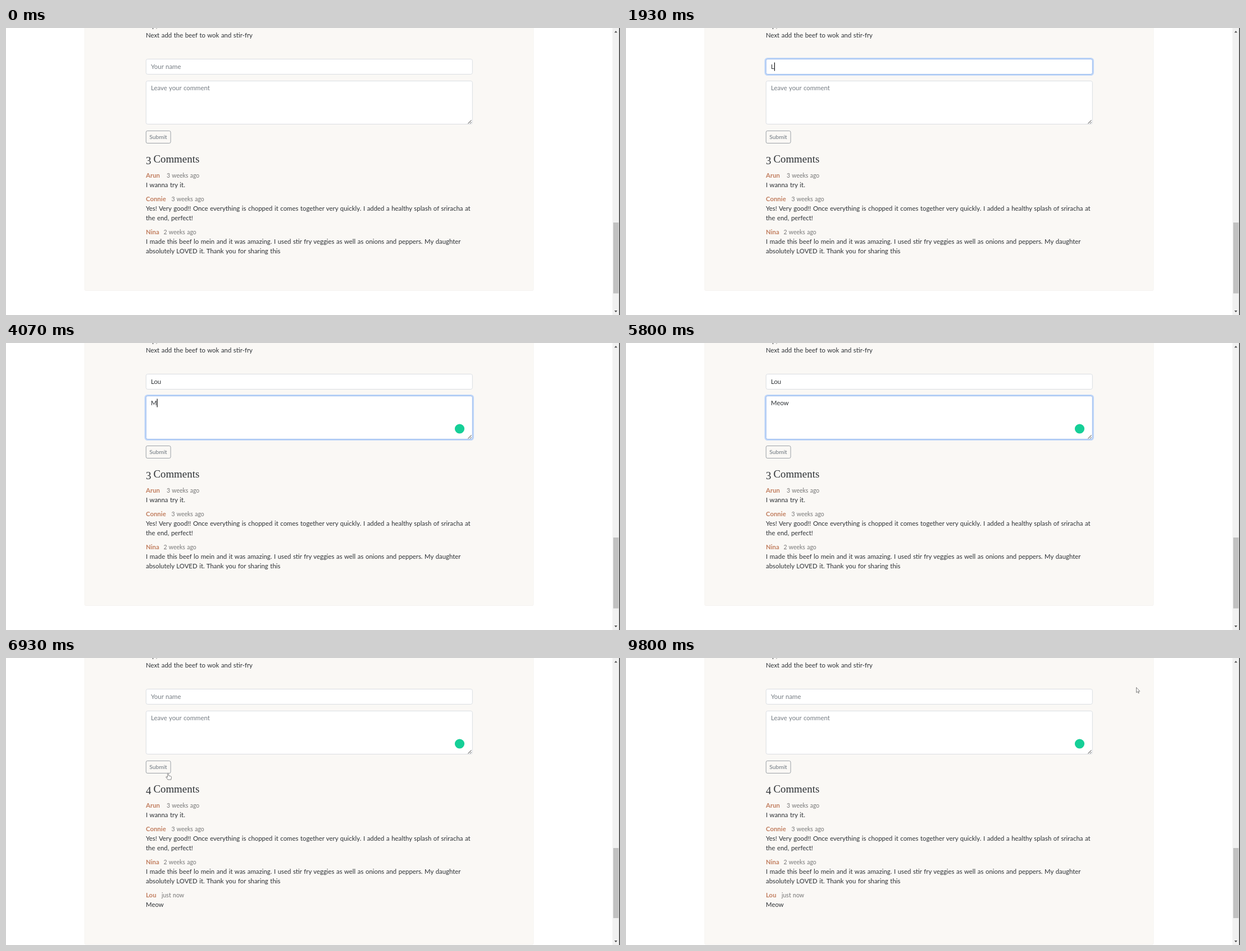
Animation, 1093 px wide and 512 px high, one loop 9940 ms. Source, as an HTML page:

```html
<!DOCTYPE html>
<html lang="en">
<head>
<meta charset="utf-8">
<title>Recipe comments</title>
<style>
html, body { margin: 0; width: 100%; height: 100%; overflow: hidden; background: #fff; }
svg { display: block; width: 1093px; height: 512px; }
text { font: 11.39px Lato, sans-serif; word-spacing: .66px; fill: #2d3135; white-space: pre; }
.hint { fill: #757c83; }
.name { font-weight: 700; fill: #c27f60; }
.date { font-size: 10.5px; fill: #777; }
.title { font: 18.9px "Liberation Serif", serif; word-spacing: -.8px; }
.btn { font-size: 10.3px; fill: #6c757d; }
.box { fill: #fff; stroke: #d6dbe0; stroke-width: .9; }
.box.focus { stroke: #8fb4ee; }
.ring { fill: none; stroke: #c0d7f8; stroke-width: 3; }
.pointer { fill: #fff; stroke: #666; stroke-width: .8; stroke-linejoin: round; }
</style>
</head>
<body>
<svg viewBox="0 0 1093 512">
  <rect id="panel" x="140" y="-9" width="799" fill="#faf8f5" stroke="#f4f2ef" stroke-width=".8" rx="2"/>
  <text x="249" y="0">Dip,</text>
  <text x="249" y="17">Next add the beef to wok and stir-fry</text>

  <rect id="nameRing" class="ring" x="248" y="54.5" width="583.5" height="29" rx="4"/>
  <rect id="nameBox" class="box" x="249.3" y="55.5" width="581" height="27" rx="3"/>
  <text id="nameText" x="258" y="73"></text>

  <rect id="noteRing" class="ring" x="248" y="93.5" width="583.5" height="79" rx="4"/>
  <rect id="noteBox" class="box" x="249.3" y="94.5" width="581" height="77" rx="3"/>
  <text id="noteText" x="258" y="111"></text>
  <path d="M822.5 170.5l6-6M826 170.5l2.5-2.5" stroke="#333" fill="none"/>
  <circle id="badge" cx="807.5" cy="153" r="8.6" fill="#15cf97"/>
  <rect id="caret" width="1.2" height="15" fill="#111"/>

  <rect id="button" x="249.3" y="183.5" width="43.8" height="22" rx="2.5" stroke="#858c93" stroke-width=".8"/>
  <text id="label" class="btn" x="255.2" y="198">Submit</text>

  <text class="title" x="249" y="239.5"><tspan id="count" dy="3"></tspan><tspan dy="-3"> Comments</tspan></text>
  <g id="comments"></g>

  <rect x="1079.5" width="12" height="512" fill="#f1f1f1"/>
  <rect id="thumb" x="1081" width="9.5" fill="#c1c1c1"/>
  <path d="M1083 8.3l2.6-3.2 2.6 3.2zM1083 504l2.6 3.2 2.6-3.2z" fill="#505050"/>
  <rect x="1091.5" width="1.5" height="512" fill="#333"/>

  <circle id="dot" cx="389.5" cy="69" r="1.8" fill="#cf8486"/>
  <path id="hand" class="pointer" d="M-1 1Q0-.8 1 1V5L5 6Q6 6.3 6 7.5L5.3 12H-.5L-3.5 8Q-4 6.3-2.5 6.8L-1 8Z"/>
  <path id="arrow" class="pointer" d="M0 0V9.3L2.1 7.3 3.5 10.4 4.8 9.8 3.5 6.8H6.2Z"/>
</svg>
<script>
const LOOP = 9940, SENT = 6870;
const $ = id => document.getElementById(id);
const show = (id, on) => $(id).style.display = on ? '' : 'none';
const attrs = (id, set) => { for (const k in set) $(id).setAttribute(k, set[k]); };

// Author, date, x of the date, baseline, lines
const comments = [
  ['Arun', '3 weeks ago', 286, 267, 'I wanna try it.'],
  ['Connie', '3 weeks ago', 294.5, 309,
    'Yes! Very good!! Once everything is chopped it comes together very quickly. I added a healthy splash of sriracha at',
    'the end, perfect!'],
  ['Nina', '2 weeks ago', 280.5, 368,
    'I made this beef lo mein and it was amazing. I used stir fry veggies as well as onions and peppers. My daughter',
    'absolutely LOVED it. Thank you for sharing this'],
  ['Lou', 'just now', 277, 427, 'Meow']
];
$('comments').innerHTML = comments.map(([who, when, x, y, ...lines]) =>
  `<g><text class="name" x="249" y="${y}">${who}</text><text class="date" x="${x}" y="${y}">${when}</text>` +
  lines.map((s, i) => `<text x="249" y="${y + 16.7 + i * 17}">${s}</text>`).join('') + '</g>').join('');

const fields = [
  { id: 'name', hint: 'Your name', text: 'Lou', keys: [1730, 2070, 2400], from: 870, to: 3530, caretY: 61.5 },
  { id: 'note', hint: 'Leave your comment', text: 'Meow', keys: [4070, 4330, 4670, 5130], from: 3530, to: SENT, caretY: 99.5 }
];

function drawField(f, t) {
  const typed = f.keys.filter(k => k <= t);
  const value = t < SENT ? f.text.slice(0, typed.length) : '';
  const focus = t >= f.from && t < f.to;
  const text = $(f.id + 'Text');
  text.textContent = value || f.hint;
  text.setAttribute('class', value ? '' : 'hint');
  $(f.id + 'Box').setAttribute('class', focus ? 'box focus' : 'box');
  show(f.id + 'Ring', focus);
  if (!focus) return;
  const since = t - (typed.pop() ?? f.from);
  const width = value ? text.getComputedTextLength() : 0;
  show('caret', Math.floor(since / 530) % 2 === 0);
  attrs('caret', { x: 258 + width, y: f.caretY });
}

// Moves a pointer from a to b between two times
function move(id, t, t0, t1, a, b) {
  const p = Math.min(1, Math.max(0, (t - t0) / (t1 - t0)));
  const e = p * p * (3 - 2 * p);
  attrs(id, { transform: `translate(${a[0] + (b[0] - a[0]) * e} ${a[1] + (b[1] - a[1]) * e})` });
}

function draw(t) {
  const sent = t >= SENT;
  show('caret', false);
  fields.forEach(f => drawField(f, t));
  show('badge', t >= 3930);
  show('dot', t >= 870 && t < 1530);

  const hover = t >= 6200 && !sent;
  attrs('button', { fill: hover ? '#6c757d' : 'none' });
  $('label').style.fill = hover ? '#fff' : '';

  $('count').textContent = sent ? 4 : 3;
  $('comments').lastChild.style.display = sent ? '' : 'none';
  attrs('panel', { height: sent ? 520 : 477.5 });
  attrs('thumb', sent ? { y: 339, height: 125 } : { y: 347, height: 126.5 });

  show('hand', t >= 6200 && t < 7930);
  show('arrow', t >= 6070 && t < 6200 || t >= 9670);
  if (t < 6200) move('arrow', t, 6070, 6200, [330, 170], [292, 198]);
  else move('arrow', t, 9670, 9800, [911, 12], [908.5, 52.5]);
  if (t < 6900) move('hand', t, 6200, 6330, [292, 198], [288.5, 205]);
  else move('hand', t, 7070, 7870, [288.5, 205], [912, 1.5]);
}

const start = performance.now();
function tick() {
  draw((performance.now() - start) % LOOP);
  requestAnimationFrame(tick);
}
tick();
</script>
</body>
</html>
```
